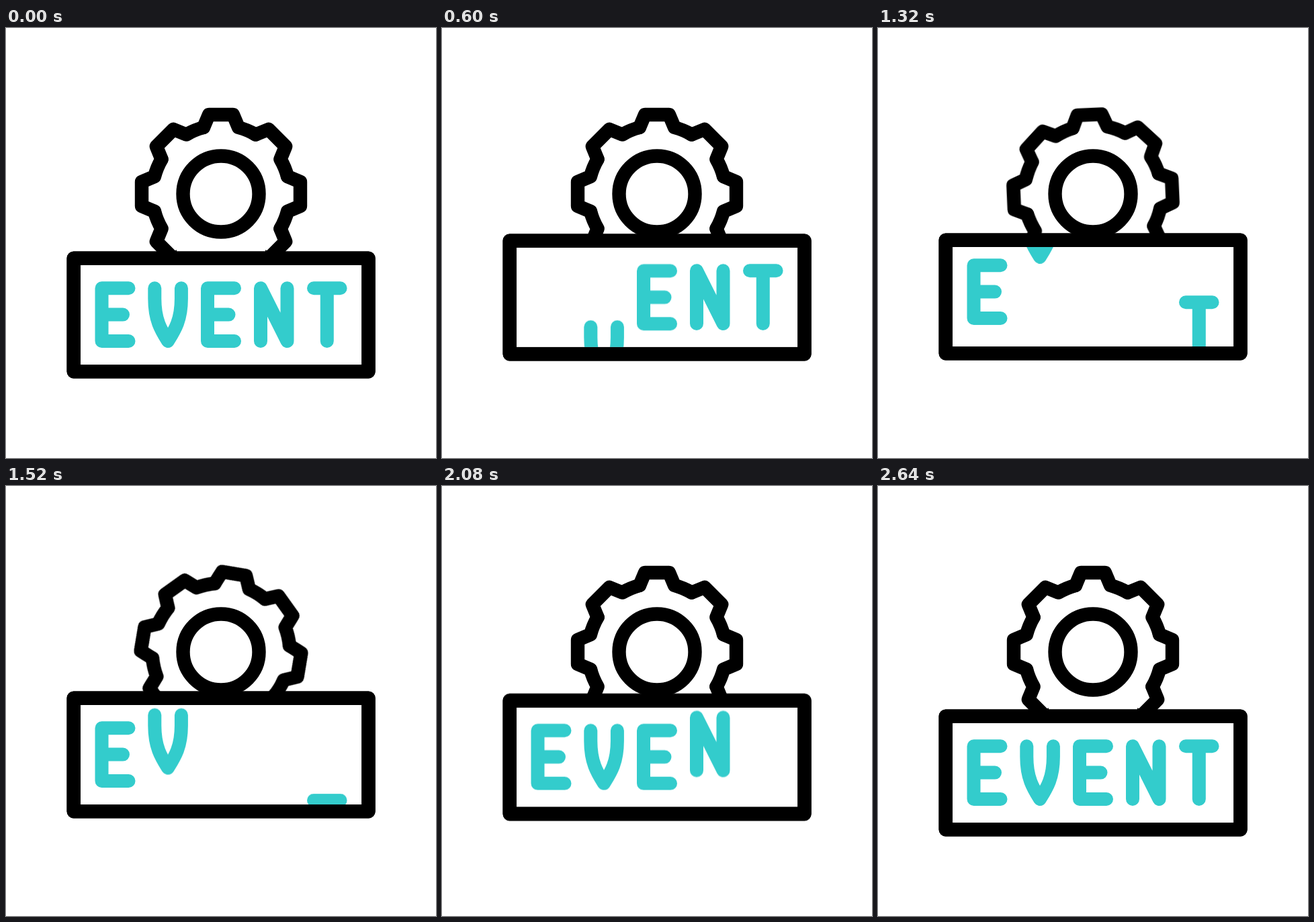
Write an HTML page that moves like this. It is 640 px wide and 640 px high and loops after 2840 ms.

```html
<!DOCTYPE html>
<html lang="en">
<head>
<meta charset="utf-8">
<title>Event sign</title>
<style>
  html, body { margin: 0; width: 100%; height: 100%; overflow: hidden; background: #fff; }

  svg {
    display: block;
    width: 100%;
    height: 100%;
    fill: none;
    stroke: #000;
    stroke-width: 20.4;
    stroke-linecap: round;
    stroke-linejoin: round;
  }

  .gear { animation: spin 2840ms linear infinite; }
  .sign { animation: lift 2840ms linear infinite; }
  .letters { stroke: #33cccc; stroke-width: 20; }
  .letters path {
    animation: drop 2840ms linear infinite;
    animation-delay: calc(var(--i) * 280ms);
  }

  /* half a turn, cubic in and out */
  @keyframes spin {
    0%, 23.239% { transform: rotate(0deg); }
    23.239% { animation-timing-function: cubic-bezier(.3333, 0, .6667, 0); }
    47.183% { transform: rotate(90deg); animation-timing-function: cubic-bezier(.3333, 1, .6667, 1); }
    71.127%, 100% { transform: rotate(180deg); }
  }

  /* the sign rises, waits, and settles back, quadratic in and out */
  @keyframes lift {
    0%, 2.817% { transform: translateY(0); }
    2.817%, 70.423% { animation-timing-function: cubic-bezier(.3333, 0, .6667, .3333); }
    13.38%, 80.986% {
      transform: translateY(-13.5px);
      animation-timing-function: cubic-bezier(.3333, .6667, .6667, 1);
    }
    23.944%, 70.423% { transform: translateY(-27px); }
    91.549%, 100% { transform: translateY(0); }
  }

  /* a letter winds up, falls out below and returns from above */
  @keyframes drop {
    0%, 1.408% { transform: translateY(0); }
    1.408% { animation-timing-function: cubic-bezier(.3333, 0, .6667, -.5672); }
    22.676% { transform: translateY(180px); animation-timing-function: step-end; }
    32.394% { transform: translateY(-193px); animation-timing-function: cubic-bezier(.3333, 1, .6667, 1); }
    53.521%, 100% { transform: translateY(0); }
  }
</style>
</head>
<body>
<svg viewBox="0 0 640 640">
  <defs>
    <path id="tooth" d="M-26-99L-18-118H18L26-99A102.4 102.4 0 0 1 51.6-88.4"/>
    <clipPath id="panel"><rect x="111" y="353" width="418.5" height="148"/></clipPath>
  </defs>

  <g transform="translate(320 247)">
    <g class="gear">
      <use href="#tooth"/>
      <use href="#tooth" transform="rotate(45)"/>
      <use href="#tooth" transform="rotate(90)"/>
      <use href="#tooth" transform="rotate(135)"/>
      <use href="#tooth" transform="rotate(180)"/>
      <use href="#tooth" transform="rotate(225)"/>
      <use href="#tooth" transform="rotate(270)"/>
      <use href="#tooth" transform="rotate(315)"/>
    </g>
    <!-- the gear stays open at the bottom -->
    <rect x="-66" y="75" width="132" height="60" fill="#fff" stroke="none"/>
    <circle r="56.5"/>
  </g>

  <g class="sign">
    <rect x="100.7" y="342.8" width="438.8" height="168.4" fill="#fff"/>
    <g class="letters" clip-path="url(#panel)">
      <path style="--i:0" d="M182.5 387.2H142.5V466H182.5M142.5 426.6H174"/>
      <path style="--i:1" d="M221.3 387.2V403C221.3 435 231 450 241 466C251 450 260.9 435 260.9 403V387.2"/>
      <path style="--i:2" d="M340 387.2H300V466H340M300 426.6H331.5"/>
      <path style="--i:3" d="M379 466V387.2L418.5 466V387.2"/>
      <path style="--i:4" d="M458 387.2H497.6M477.8 387.2V466"/>
    </g>
    <rect x="100.7" y="342.8" width="438.8" height="168.4"/>
  </g>
</svg>
</body>
</html>
```
